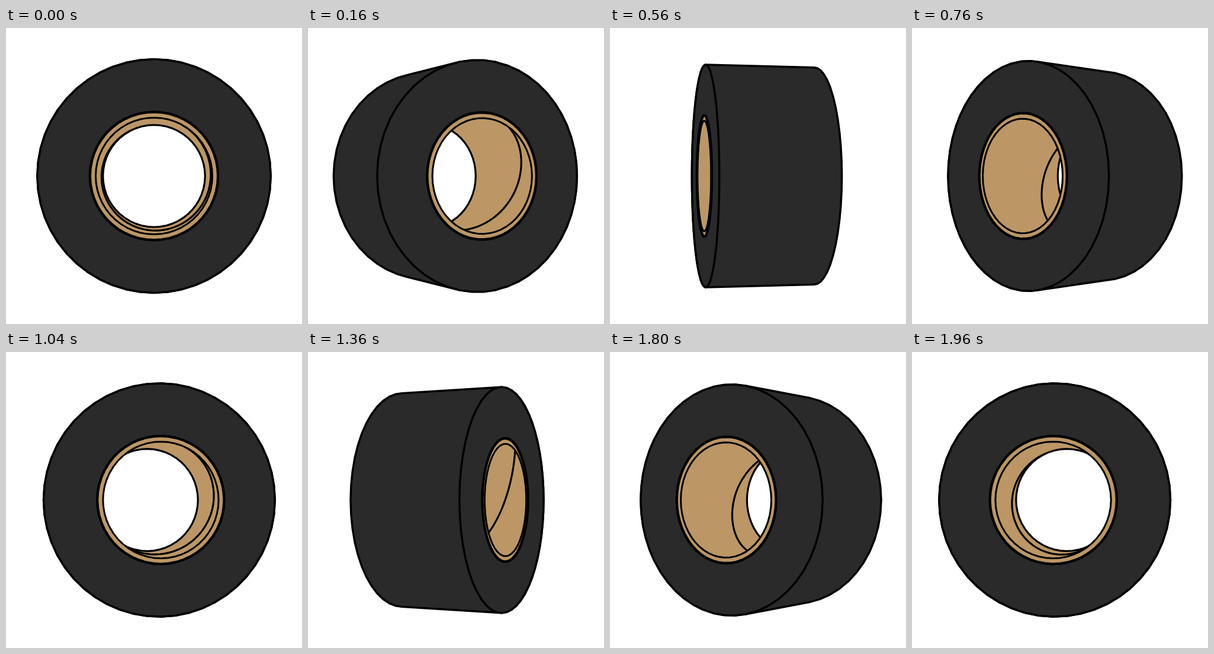
An HTML page with a canvas for the animation above (2 s loop, 500 by 500 pixels).

```html
<!DOCTYPE html>
<html lang="en">
<head>
<meta charset="utf-8">
<title>Rotating roll of tape</title>
<style>
  html, body { margin: 0; width: 100%; height: 100%; overflow: hidden; background: #fff; }
  canvas { display: block; width: 500px; height: 500px; }
</style>
</head>
<body>
<canvas id="stage" width="500" height="500"></canvas>
<script>
const ctx = document.getElementById('stage').getContext('2d');
const LOOP = 2000, STEP = 40;
const EYE = 1380;            // camera distance
const HALF = 92;             // half the width of the roll
const OUTER = 184, CORE = 101, HOLE = 92;
const TAPE = '#2a2a2a', CARD = '#bc9765', INK = '#000';
const RAD = Math.PI / 180;
const SEAM_FROM = 60 * RAD, SEAM_TURN = -305.5 * RAD;

let sin = 0, cos = 1;

// A point on the roll: angle around the axis, radius, place along the axis.
function project(angle, r, along) {
  const side = r * Math.cos(angle);
  const x = along * sin + side * cos;
  const z = along * cos - side * sin;
  const k = EYE / (EYE - z);
  return [250 + x * k, 250 - r * Math.sin(angle) * k];
}

function circle(r, along, n = 52) {
  return Array.from({ length: n }, (_, i) => project(i / n * 2 * Math.PI, r, along));
}

function seam(n = 90) {
  return Array.from({ length: n + 1 }, (_, i) =>
    project(SEAM_FROM + SEAM_TURN * i / n, HOLE, HALF * (1 - 2 * i / n)));
}

function hull(points) {
  const sorted = points.slice().sort((a, b) => a[0] - b[0] || a[1] - b[1]);
  const half = list => {
    const out = [];
    for (const p of list) {
      while (out.length > 1) {
        const a = out[out.length - 2], b = out[out.length - 1];
        const turn = (b[0] - a[0]) * (p[1] - a[1]) - (b[1] - a[1]) * (p[0] - a[0]);
        if (turn > 0) break;
        out.pop();
      }
      out.push(p);
    }
    out.pop();
    return out;
  };
  return half(sorted).concat(half(sorted.reverse()));
}

function trace(points, closed = true) {
  ctx.beginPath();
  points.forEach(p => ctx.lineTo(p[0], p[1]));
  if (closed) ctx.closePath();
}

function shape(points, fill, width) {
  trace(points);
  if (fill) {
    ctx.fillStyle = fill;
    ctx.fill();
  }
  ctx.lineWidth = width;
  ctx.stroke();
}

function drawFace(front) {
  const rim = circle(HOLE, front);
  shape(circle(OUTER, front), TAPE, 3.5);
  shape(circle(CORE, front), CARD, 4.4);

  // inside of the core, seen through the front opening
  ctx.save();
  trace(rim);
  ctx.clip();
  shape(circle(HOLE, -front), '#fff', 3.2);
  trace(seam(), false);
  ctx.lineWidth = 3.2;
  ctx.stroke();
  ctx.restore();

  shape(rim, null, 3);
}

function draw(time) {
  const turn = time / LOOP * 2 * Math.PI;
  sin = Math.sin(turn);
  cos = Math.cos(turn);
  ctx.fillStyle = '#fff';
  ctx.fillRect(0, 0, 500, 500);
  ctx.strokeStyle = INK;
  ctx.lineJoin = 'round';
  shape(hull(circle(OUTER, HALF).concat(circle(OUTER, -HALF))), TAPE, 3.5);
  if (EYE * Math.abs(cos) > HALF) drawFace(cos > 0 ? HALF : -HALF);
}

const start = performance.now();
function tick() {
  const time = (performance.now() - start) % LOOP;
  draw(Math.floor(time / STEP) * STEP);
  requestAnimationFrame(tick);
}
tick();
</script>
</body>
</html>
```
